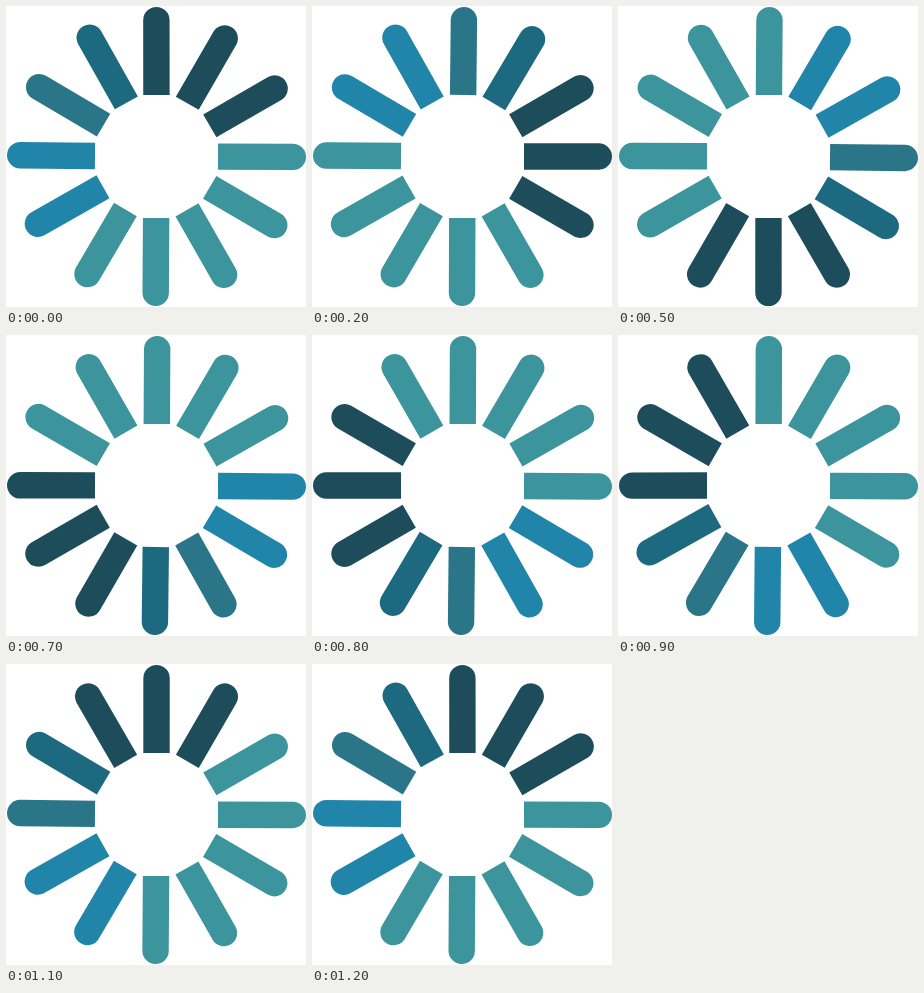
Recreate the animation shown at these times as an HTML page with a canvas. Size 300 px wide and 301 px high, loop 1.3 s.

```html
<!DOCTYPE html>
<html>
<head>
<meta charset="utf-8">
<style>
html, body { margin: 0; width: 100%; height: 100%; overflow: hidden; background: #fff; }
canvas { display: block; }
</style>
</head>
<body>
<canvas id="stage" width="300" height="301"></canvas>
<script>
const ctx = document.getElementById('stage').getContext('2d');
const COUNT = 12, STEP = 100, LOOP = 1300;
const CENTER = 150.5, INNER = 61.5, OUTER = 149.5, HALF = 13.2;
const DARK = '#1d4d5b', TEAL = '#3c949c', BLUE = '#2184a9', MID = '#2a7587', DEEP = '#1d697f';
const COLORS = [DARK, DARK, DARK, TEAL, TEAL, TEAL, TEAL, TEAL, BLUE, BLUE, MID, DEEP];

function bar(degrees, color) {
  ctx.save();
  ctx.translate(CENTER, CENTER);
  ctx.rotate(degrees * Math.PI / 180);
  ctx.fillStyle = color;
  ctx.beginPath();
  ctx.moveTo(-HALF, -INNER);
  ctx.arc(0, HALF - OUTER, HALF, Math.PI, 0);
  ctx.lineTo(HALF, -INNER);
  ctx.closePath();
  ctx.fill();
  ctx.restore();
}

// The whole wheel turns one bar per step; bars are spaced slightly over 30 degrees.
function draw(time) {
  const turn = Math.floor((time % LOOP) / STEP) % COUNT;
  ctx.fillStyle = '#fff';
  ctx.fillRect(0, 0, 300, 301);
  COLORS.forEach((color, i) => bar((i + turn) * 30 + i * 0.065 - 0.05, color));
}

const start = performance.now();
function tick() {
  draw(performance.now() - start);
  requestAnimationFrame(tick);
}
tick();
</script>
</body>
</html>
```
